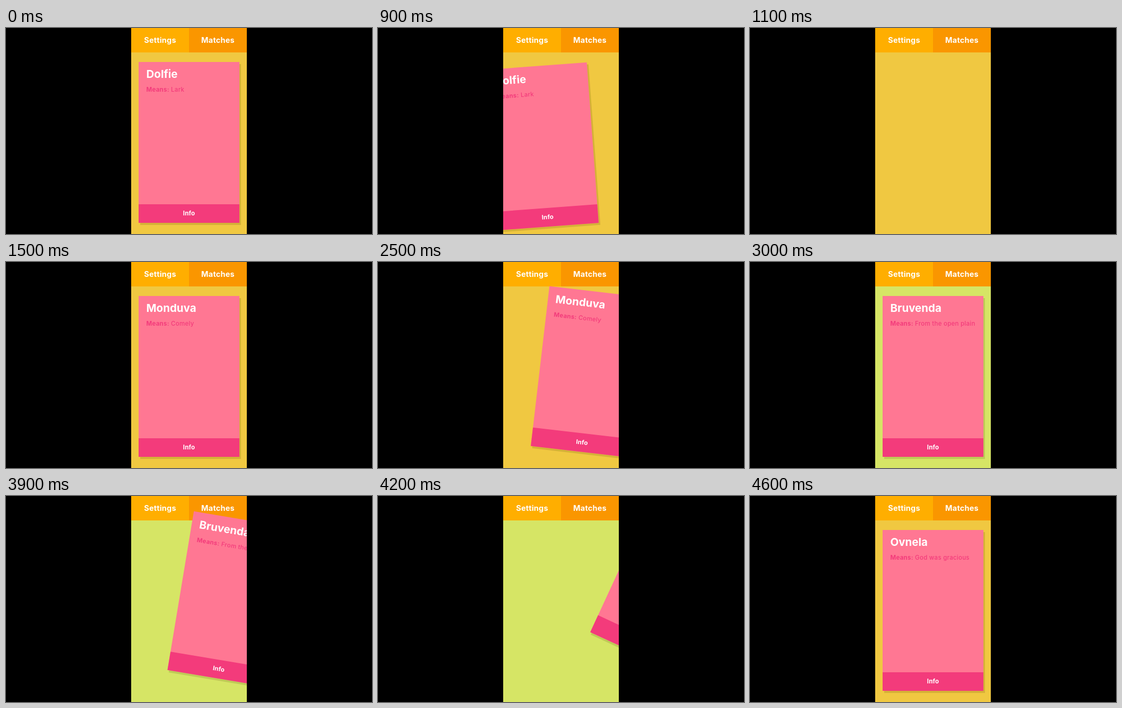
An HTML page that plays this animation: 690 by 388 pixels, repeating every 4700 ms.

```html
<!DOCTYPE html>
<html lang="en">
<head>
<meta charset="utf-8">
<title>Name cards</title>
<style>
  html, body {
    margin: 0;
    width: 100%;
    height: 100%;
    overflow: hidden;
    background: #000;
  }
  .phone {
    position: absolute;
    left: 236px;
    top: 0;
    width: 218px;
    height: 388px;
    overflow: hidden;
    background: #f0c841;
    font-family: Inter, "Open Sans", sans-serif;
    font-weight: 700;
    color: #fff;
    animation: backdrop 4.7s step-end infinite;
  }
  .tabs {
    display: flex;
    height: 46px;
    font-size: 14.5px;
    line-height: 46px;
    letter-spacing: .2px;
    text-align: center;
  }
  .tabs div { flex: 1; background: #ffae00; }
  .tabs div + div { background: #fa9600; }

  /* --x is the drag distance; lift and tilt follow from it */
  .card {
    --x: 0;
    position: absolute;
    left: 14px;
    top: 64px;
    width: 190px;
    height: 303px;
    background: #ff7793;
    box-shadow: 3px 4px rgba(60, 50, 0, .15);
    transform:
      translate(calc(var(--x) * 1px), calc(var(--x) * var(--lift) * 1px))
      rotate(calc(var(--x) * .121deg));
    animation: 4.7s step-end infinite;
  }
  .card h1 {
    position: absolute;
    left: 14.5px;
    top: 9.5px;
    margin: 0;
    font-size: 20.5px;
    line-height: 26px;
  }
  .card p {
    position: absolute;
    left: 14.5px;
    top: 45px;
    width: 162px;
    margin: 0;
    font-size: 11.5px;
    font-weight: 550;
    line-height: 14.5px;
    letter-spacing: .25px;
    color: #f33b7b;
  }
  .card footer {
    position: absolute;
    left: 0;
    right: 0;
    bottom: 0;
    height: 35px;
    font-size: 11.6px;
    line-height: 34.5px;
    letter-spacing: .1px;
    text-align: center;
    background: #f33b7b;
  }

  .first  { --lift: -.21;  animation-name: first; }
  .second { --lift: -.155; animation-name: second; }
  .third  { --lift: -.277; animation-name: third; }
  .fourth { --lift: 0;     animation-name: fourth; }

  @keyframes backdrop {
    0%     { background-color: #f0c841; }
    63.82% { background-color: #d6e565; }
    95.74%, 100% { background-color: #f0c841; }
  }
  @keyframes first {
    0%     { --x: 0; }
    17.02% { --x: -9; }
    19.14% { --x: -35; }
    21.27% { --x: -120; }
    23.4%, 100% { --x: -600; }
  }
  @keyframes second {
    0%     { --x: 600; }
    31.91% { --x: 0; }
    53.19% { --x: 55; }
    55.31% { --x: 92; }
    57.44% { --x: 150; }
    59.57%, 100% { --x: 600; }
  }
  @keyframes third {
    0%     { --x: 600; }
    63.82% { --x: 0; }
    82.97% { --x: 78; }
    85.1%  { --x: 102; }
    87.23% { --x: 140; }
    89.36% { --x: 205; }
    91.48%, 100% { --x: 600; }
  }
  @keyframes fourth {
    0%     { --x: 600; }
    95.74%, 100% { --x: 0; }
  }
</style>
</head>
<body>
<div class="phone">
  <div class="tabs"><div>Settings</div><div>Matches</div></div>
  <div class="card first">
    <h1>Dolfie</h1>
    <p><b>Means:</b> Lark</p>
    <footer>Info</footer>
  </div>
  <div class="card second">
    <h1>Monduva</h1>
    <p><b>Means:</b> Comely</p>
    <footer>Info</footer>
  </div>
  <div class="card third">
    <h1>Bruvenda</h1>
    <p><b>Means:</b> From the open plain</p>
    <footer>Info</footer>
  </div>
  <div class="card fourth">
    <h1>Ovnela</h1>
    <p><b>Means:</b> God was gracious</p>
    <footer>Info</footer>
  </div>
</div>
</body>
</html>
```
